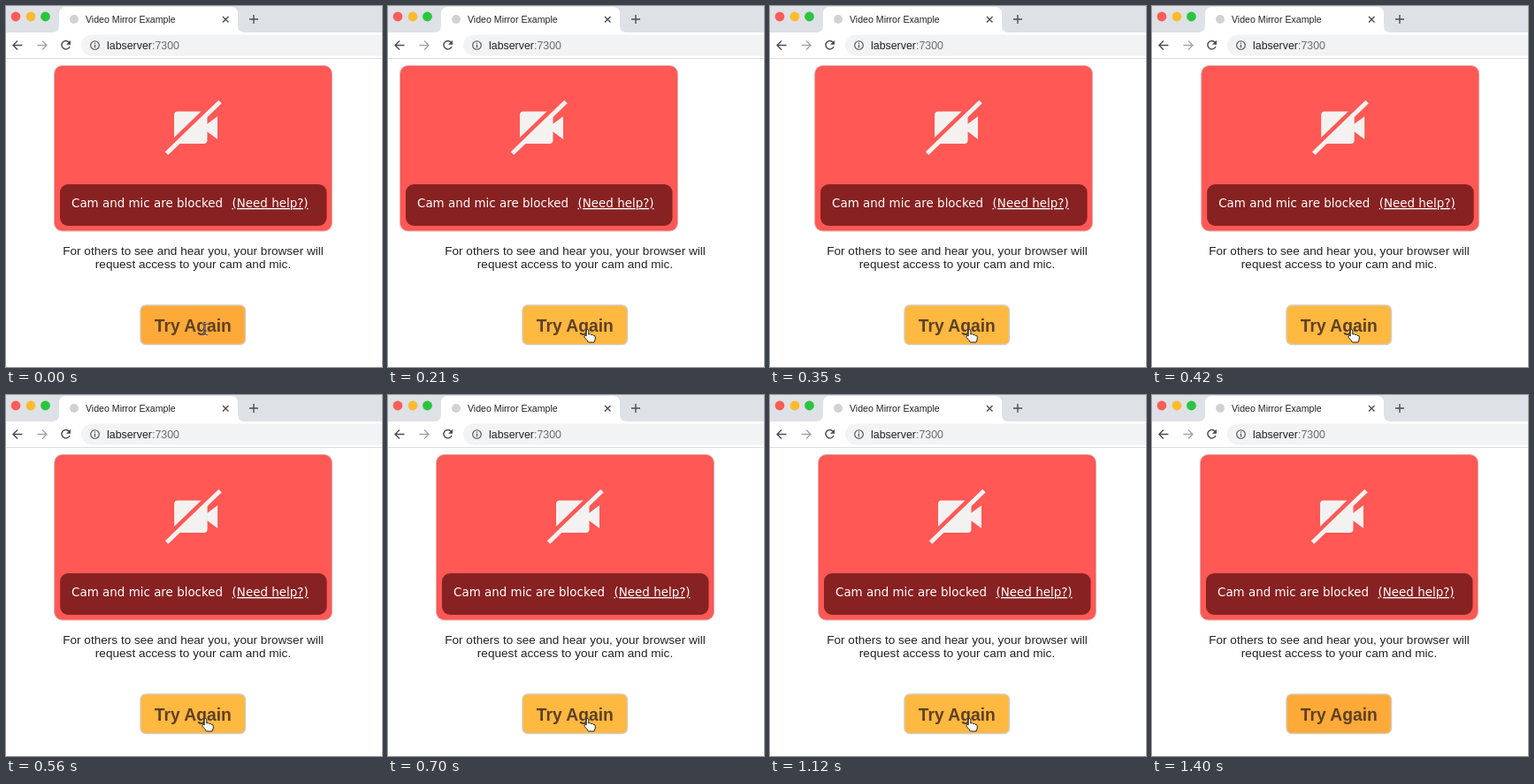
An HTML page that plays this animation: 425x409 px, repeating every 1.47 s.

```html
<!DOCTYPE html>
<html lang="en">
<head>
<meta charset="utf-8">
<title>Video Mirror Example</title>
<style>
  html, body { margin: 0; width: 100%; height: 100%; overflow: hidden; background: #fff; }
  svg { display: block; width: 425px; height: 409px; }
  text { font-family: "Liberation Sans", Arial, sans-serif; fill: #222; }
  .icon { fill: none; stroke: #4b4d50; stroke-width: 1.4; }
  .notice text { font: 13.45px "DejaVu Sans", Verdana, sans-serif; fill: #fff; }
  .copy { font-size: 13.6px; text-anchor: middle; }
  .label { font-size: 19.3px; font-weight: bold; text-anchor: middle; fill: #5f4025; }
  .cursor { visibility: hidden; }
</style>
</head>
<body>
<svg viewBox="0 0 425 409">
  <rect width="425" height="30" fill="#dee1e6"/>
  <path d="M52 30Q60 30 60 22V9Q60 1 68 1H254Q262 1 262 9V22Q262 30 270 30Z" fill="#fff"/>
  <circle cx="11" cy="12" r="5.4" fill="#fc5d57"/>
  <circle cx="28" cy="12" r="5.4" fill="#fdbb2d"/>
  <circle cx="44.500" cy="12" r="5.4" fill="#2ac53f"/>
  <circle cx="77" cy="15" r="5" fill="#d2d2d2"/>
  <text x="90" y="19" font-size="10.6">Video Mirror Example</text>
  <path class="icon" d="M245 12l6.500 6.500M251.500 12l-6.500 6.500M275 15h10M280 10v10"/>

  <path class="icon" d="M18.500 44.500H8.500M13 39.500l-5 5 5 5"/>
  <path class="icon" d="M35.500 44.500H45.500M41 39.500l5 5-5 5" style="stroke:#a3a5a8"/>
  <path class="icon" d="M71.300 41.200A4.700 4.700 0 1 0 72 46"/>
  <path d="M73 38.800v5h-5z" fill="#4b4d50"/>
  <rect x="85" y="32.500" width="360" height="24" rx="12" fill="#f1f3f4"/>
  <circle class="icon" cx="100.500" cy="44.500" r="4.800" style="stroke-width:1.1"/>
  <path class="icon" d="M100.500 43.700v3.500M100.500 41.500v1.200" style="stroke-width:1.2"/>
  <text x="114" y="49" font-size="12.400">labserver<tspan fill="#6a6d70">:7300</tspan></text>
  <path d="M0 59.500H425" stroke="#dadcdf"/>

  <g id="card">
    <rect x="54.500" y="67.500" width="314" height="187.500" rx="9" fill="#ff5855" stroke="#dcb3b1"/>
    <g fill="#f3f2f0">
      <rect x="190" y="119.500" width="37.500" height="36.500" rx="4"/>
      <path d="M227 134L239 125V151L227 142Z"/>
      <path d="M177.500 164.500L238.500 105.500" stroke="#ff5855" stroke-width="5"/>
      <path d="M181.500 167L242 108.500" stroke="#f3f2f0" stroke-width="5"/>
    </g>
    <g class="notice">
      <rect x="61" y="202" width="301.500" height="47" rx="9" fill="#882122"/>
      <text x="74" y="228">Cam and mic are blocked</text>
      <text x="255.500" y="228" text-decoration="underline">(Need help?)</text>
    </g>
  </g>

  <text class="copy" x="211.500" y="282">For others to see and hear you, your browser will</text>
  <text class="copy" x="211.500" y="297">request access to your cam and mic.</text>

  <rect id="button" x="152" y="339" width="118.500" height="44.500" rx="6" stroke="#d5ccba" stroke-width="1.500"/>
  <text class="label" x="211.300" y="368.500">Try Again</text>

  <g id="beam" class="cursor" fill="none">
    <path d="M-3-6Q0-6 0-4Q0-6 3-6M0-4V5M-3 7Q0 7 0 5Q0 7 3 7M-2 2H2" stroke="#fff" stroke-width="2.200" opacity=".6"/>
    <path d="M-3-6Q0-6 0-4Q0-6 3-6M0-4V5M-3 7Q0 7 0 5Q0 7 3 7M-2 2H2" stroke="#3a2622"/>
  </g>
  <path id="hand" class="cursor" fill="#fff" stroke="#222" stroke-linejoin="round"
    d="M-1.300 7V1Q-1.300-.5 0-.5T1.300 1V5Q3.500 4 4 5.500Q6 4.800 6.500 6.300Q8.800 6 8.800 8V10Q8.500 12 7.500 14H1Q0 12-3.300 8.500Q-4.200 6.600-2.600 6.300Q-1.900 6.300-1.300 7Z"/>
  <path id="arrow" class="cursor" fill="#111" stroke="#fff" d="M0 0V13L3 10.300 5 15 7.200 14 5.200 9.500H9.200Z"/>
</svg>
<script>
  const LOOP = 1470, STEP = 70, KICK = 3;
  const $ = id => document.getElementById(id);
  const clamp = v => Math.min(1, Math.max(0, v));
  const mix = (a, b, p) => a + (b - a) * p;

  // Cursor cues: first step, shape, x, y
  const cues = [
    [0, "beam", 225, 366],
    [1, "hand", 225.500, 367],
    [17, "hand", 225.500, 374],
    [18, "arrow", 226, 389],
    [19, "arrow", 226, 403],
    [20, "", 0, 0]
  ];

  // Damped spring, half a period per step
  function shake(n) {
    return n < 0 ? 0 : -41 * Math.exp(-1.175 * n) * Math.cos(Math.PI * n);
  }

  function draw(now) {
    const step = Math.floor(now % LOOP / STEP);
    $("card").setAttribute("transform", `translate(${shake(step - KICK).toFixed(2)} 0)`);

    const glow = clamp(step / 3) - clamp((step - 17) / 3);
    $("button").setAttribute("fill", `rgb(255 ${mix(169, 184, glow)} ${mix(56, 64, glow)})`);

    const [, shape, x, y] = cues.findLast(cue => cue[0] <= step);
    for (const id of ["beam", "hand", "arrow"]) {
      $(id).style.visibility = id === shape ? "visible" : "hidden";
    }
    if (shape) $(shape).setAttribute("transform", `translate(${x} ${y})`);
  }

  const start = performance.now();
  function tick() {
    draw(performance.now() - start);
    requestAnimationFrame(tick);
  }
  tick();
</script>
</body>
</html>
```
